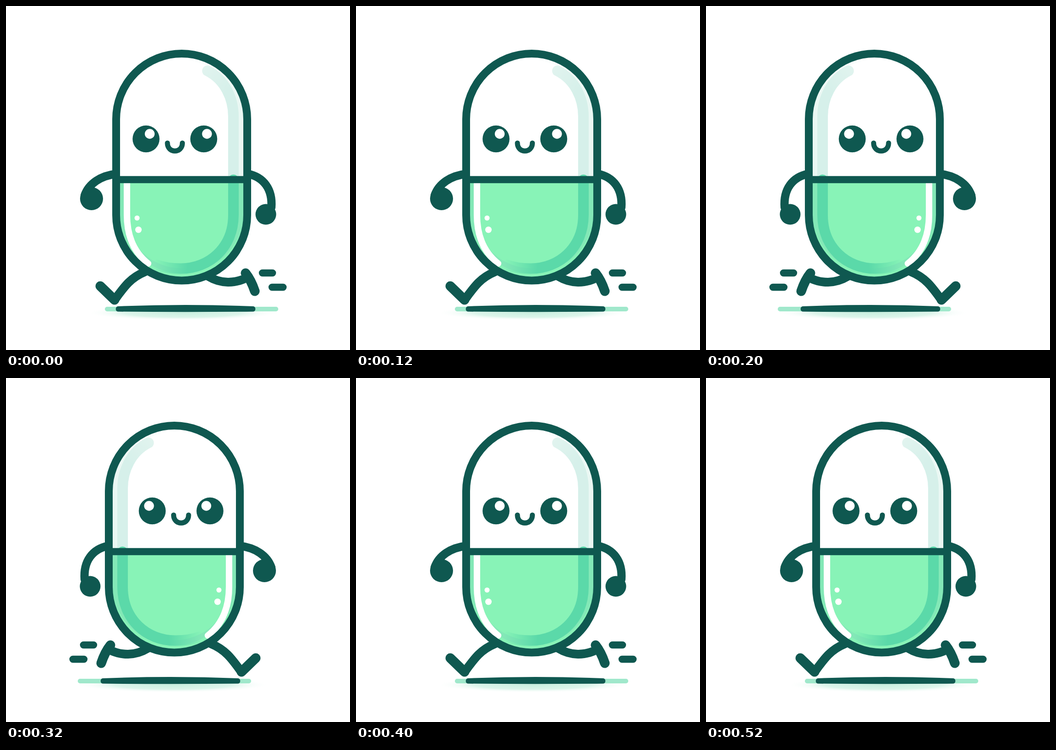
An HTML page that plays this animation: 748x748 px, repeating every 0.6 s.

```html
<!DOCTYPE html>
<html lang="en">
<head>
<meta charset="utf-8">
<title>Running capsule</title>
<style>
  html, body { margin: 0; width: 100%; height: 100%; overflow: hidden; background: #fff; }
  svg { display: block; width: 100vw; height: 100vh; }
  .line { fill: none; stroke: #0f5850; stroke-width: 17; stroke-linecap: round; stroke-linejoin: round; }
  .ink { fill: #0f5850; }
  .white { fill: #fff; }
  .shine { fill: none; stroke-linecap: round; }
</style>
</head>
<body>
<svg viewBox="0 0 748 748">
  <defs>
    <path id="pill" d="M239.5 246a142.5 142.5 0 0 1 285 0V454.5a142.5 142.5 0 0 1 -285 0Z"/>
    <clipPath id="inside"><use href="#pill"/></clipPath>
    <linearGradient id="pale" gradientUnits="userSpaceOnUse" x1="425" y1="130" x2="480" y2="185">
      <stop stop-color="#e2f4ef"/><stop offset="1" stop-color="#d6f0ea"/>
    </linearGradient>
    <linearGradient id="rim" gradientUnits="userSpaceOnUse" x1="405" y1="0" x2="517" y2="0">
      <stop stop-color="#e8f7f2" stop-opacity="0"/><stop offset="1" stop-color="#e8f7f2"/>
    </linearGradient>
    <linearGradient id="deep" gradientUnits="userSpaceOnUse" x1="322" y1="0" x2="395" y2="0">
      <stop stop-color="#5bd9a9" stop-opacity="0"/><stop offset="1" stop-color="#5bd9a9"/>
    </linearGradient>
    <radialGradient id="shadow">
      <stop stop-color="#c8efdf"/><stop offset=".6" stop-color="#dcf5eb"/>
      <stop offset="1" stop-color="#fff" stop-opacity="0"/>
    </radialGradient>
  </defs>

  <g id="runner">
    <!-- ground -->
    <ellipse cx="385" cy="667" rx="210" ry="17" fill="url(#shadow)"/>
    <path d="M220 659H587" class="shine" stroke="#a0e8cb" stroke-width="10"/>
    <path class="ink" d="M243 653Q390 647 538 653A6 6 0 0 1 538 664.5Q390 666 243 664.5A6 6 0 0 1 243 653Z"/>

    <!-- arms and legs -->
    <g class="line">
      <path d="M240 365C206 369 180 386 171 412" stroke-width="18"/>
      <path d="M526 365C560 372 580 398 577 438" stroke-width="18"/>
      <path d="M302 578C270 591 256 612 237 638" style="stroke-width:19"/>
      <path d="M440 588C468 605 498 603 521 592" style="stroke-width:19"/>
      <path d="M205 609L236 639" style="stroke-width:21"/>
      <path d="M521 581Q533 596 541 620" style="stroke-width:21"/>
      <path d="M557.5 580.5H579.5M578.5 611.5H602.5" style="stroke-width:15.5"/>
    </g>
    <g class="ink">
      <circle cx="186" cy="419" r="25"/>
      <circle cx="565" cy="453" r="22.5"/>
    </g>

    <!-- capsule -->
    <use href="#pill" class="white"/>
    <g clip-path="url(#inside)">
      <path class="shine" stroke="url(#rim)" stroke-width="14" d="M400 114C475 120 511 180 511 246V378"/>
      <path class="shine" stroke="url(#pale)" stroke-width="23" d="M438 141C476 160 494.5 201 494.5 240V378"/>
      <path fill="#88f3b7" d="M230 378H530V610H230Z"/>
      <path class="shine" stroke="#83e8b7" stroke-width="11" d="M511.5 378V454.5A129.5 129.5 0 0 1 253 454.5V378"/>
      <path class="shine" stroke="url(#deep)" stroke-width="23" d="M494.5 378V454.5C494.5 525 442 571 380 571Q350 571 328 563"/>
      <path class="shine" stroke="#fff" stroke-width="14" d="M263 378V454C263 502 280 537 309 560"/>
      <circle class="white" cx="285" cy="461" r="5.5"/>
      <circle class="white" cx="288" cy="486.5" r="7"/>
    </g>
    <use href="#pill" class="line"/>
    <path class="line" d="M240 377.5H524" style="stroke-width:15.5"/>

    <!-- face -->
    <g class="ink">
      <circle cx="304.5" cy="289" r="29.3"/>
      <circle cx="430" cy="289" r="29.3"/>
    </g>
    <circle class="white" cx="312.5" cy="278" r="10.7"/>
    <circle class="white" cx="437" cy="278" r="10.7"/>
    <path class="line" d="M351 298C351 321 383.5 321 383.5 298" style="stroke-width:11"/>
  </g>
</svg>
<script>
  const runner = document.getElementById('runner');
  const LOOP = 600, STEP = 200;

  // The middle step of each loop faces the other way.
  function draw() {
    const step = Math.floor(performance.now() % LOOP / STEP);
    runner.setAttribute('transform', step === 1 ? 'matrix(-1 0 0 1 748 0)' : '');
    requestAnimationFrame(draw);
  }
  draw();
</script>
</body>
</html>
```
